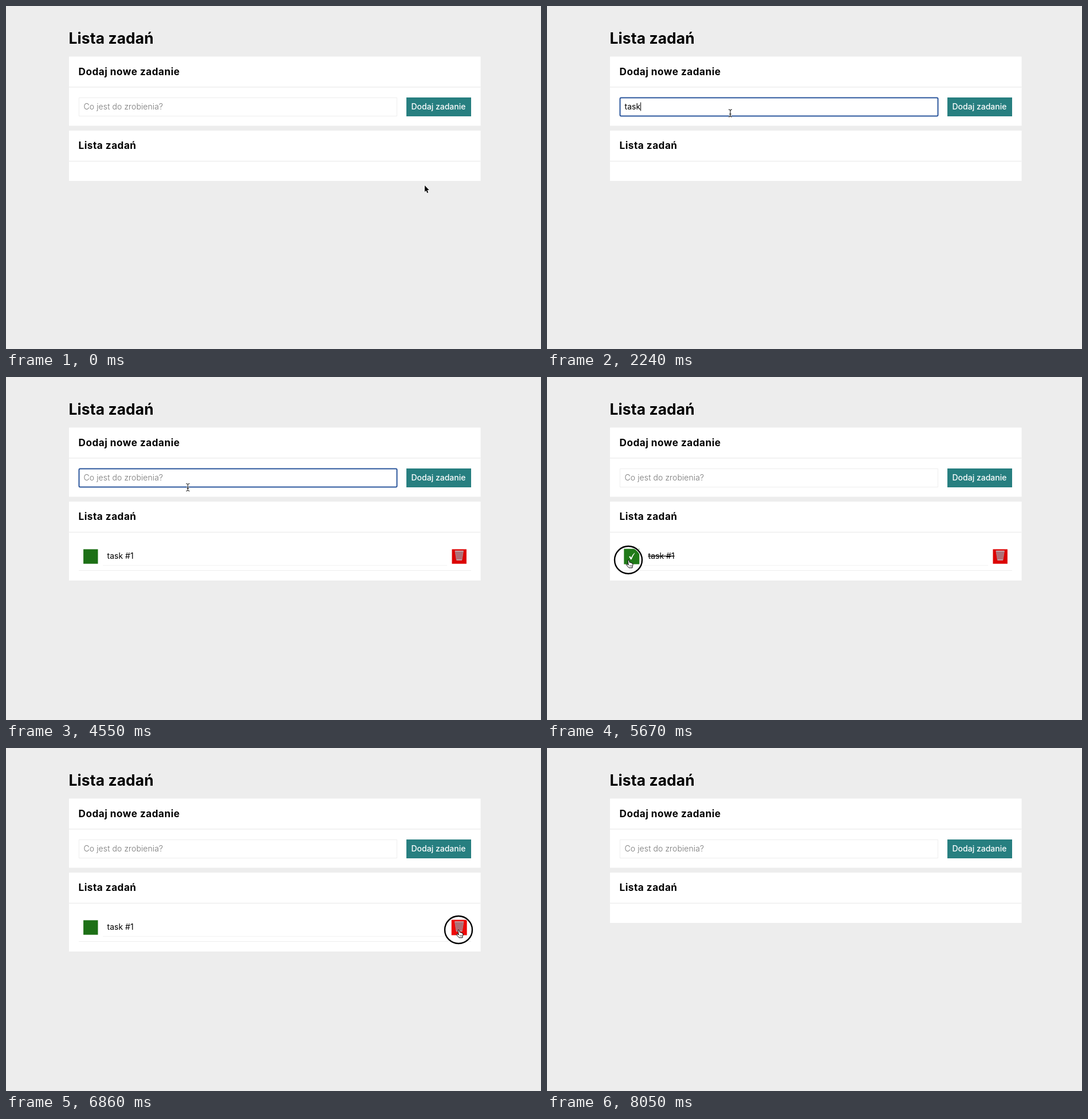
Write an HTML page that moves like this. It is 934 px wide and 600 px high and loops after 8.19 s.

```html
<!DOCTYPE html>
<html lang="pl">
<head>
<meta charset="utf-8">
<title>Lista zadań</title>
<style>
html, body { margin: 0; width: 100%; height: 100%; overflow: hidden; background: #ededed; }
svg { display: block; width: 934px; height: 600px; font: 400 14px Inter, "Open Sans", sans-serif; }
text { white-space: pre; }
.title { font-size: 26.4px; font-weight: 700; letter-spacing: .12px; }
.head { font-size: 17.2px; font-weight: 700; letter-spacing: .48px; }
.hint { font-weight: 300; letter-spacing: .1px; fill: #757575; }
.label { font-weight: 500; fill: #fff; }
.card { fill: #fff; }
.rule { stroke: #eee; stroke-width: 1.5; }
.done { text-decoration: line-through; }
</style>
</head>
<body>
<svg viewBox="0 0 934 600">
  <rect width="934" height="600" fill="#ededed"/>
  <text class="title" x="109.5" y="65.5">Lista zadań</text>

  <rect class="card" x="110" y="88.5" width="718.6" height="121"/>
  <text class="head" x="126.5" y="120.5">Dodaj nowe zadanie</text>
  <path class="rule" d="M110 141.7H828.6"/>
  <rect id="field" x="127.5" y="160.5" width="555" height="32" fill="#fff"/>
  <text id="hint" class="hint" x="135.5" y="180.5">Co jest do zrobienia?</text>
  <text id="typed" x="135.5" y="180.5"></text>
  <rect id="caret" y="168.5" width="1" height="15"/>
  <rect x="699" y="160" width="113" height="33" fill="#277f80"/>
  <text class="label" x="707.5" y="180.5">Dodaj zadanie</text>

  <rect id="list" class="card" x="110" y="218" width="718.6" height="88"/>
  <text class="head" x="126.5" y="250">Lista zadań</text>
  <path class="rule" d="M110 271.5H828.6"/>
  <g id="row">
    <path d="M169 329.5H770" stroke="#f3f3f3"/>
    <path d="M127 338.5H812" stroke="#eee"/>
    <text id="task" x="176.5" y="318">task #1</text>
    <g id="toggle">
      <rect x="-12.7" y="-12.7" width="25.4" height="25.4"/>
      <path id="tick" fill="#fff" d="M-4.5 .5L-2.6 -.8L-.9 1.8Q1.5 -3.5 4.8 -6.2L5.2 -5.6Q1.6 -.6 -.3 5L-1.8 5Q-2.8 2.4 -4.5 .5Z"/>
    </g>
    <g id="bin">
      <rect x="-12.7" y="-12.7" width="25.4" height="25.4"/>
      <path d="M-7.5 -9.5H7.5L4.8 6.5H-4.8Z" fill="#bb6a70"/>
      <path d="M-5 -8L2 4M-1 -8L4 1M3 -8L5 -4M5 -8L-2 4M1 -8L-4 1M-3 -8L-5 -4" stroke="#927b83" stroke-width=".8"/>
      <path d="M-7.5 -9.5H7.5M-4.8 6H4.8" stroke="#c9b9bc" stroke-width="1.3"/>
      <path d="M-7 -8.5L-4.8 6M7 -8.5L4.8 6" stroke="#a5878e" stroke-width=".8"/>
    </g>
  </g>

  <g id="pointer">
    <g id="ring" fill="none">
      <circle stroke="#fff" stroke-width="4.6"/>
      <circle stroke="#000" stroke-width="2.4"/>
    </g>
    <path id="arrow" d="M0 0V11L2.5 8.7L4.3 13L6.1 12.2L4.3 8H7.7Z" stroke="#fff" stroke-width="1" paint-order="stroke"/>
    <g id="beam" fill="none">
      <path d="M-3 -6Q0 -6 0 -4Q0 -6 3 -6M0 -4V5M-3 7Q0 7 0 5Q0 7 3 7M-1.7 2H1.7" stroke="#fff" stroke-width="2.6"/>
      <path d="M-3 -6Q0 -6 0 -4Q0 -6 3 -6M0 -4V5M-3 7Q0 7 0 5Q0 7 3 7M-1.7 2H1.7" stroke="#000"/>
    </g>
    <g id="hand" fill="#fff" stroke="#000" stroke-width="1" stroke-linejoin="round">
      <path d="M-1 .8Q0 -.7 1.2 .8L2.3 4.6Q3.6 3.8 4.2 5.1Q5.4 4.5 6 5.8Q7.6 5.5 7.9 7.2Q8.2 10 7 11.6V13.8H1L-3.8 8.2Q-3.4 6.3 -1.2 8L.2 9Z"/>
      <path d="M2.6 9V11.6M4.4 9V11.6M6 9V11.6" stroke-width=".6"/>
    </g>
  </g>
</svg>
<script>
const LOOP = 8190, STEP = 70;
const FOCUS = 700, ENTER = 3780, BLUR = 5180;
const DONE = 5320, UNDONE = 5810, REMOVED = 7000, GONE = 8050;
const presses = [630, 5180, 5670, 6860];
const keys = [[1470, "t"], [1610, "a"], [1750, "s"], [2100, "k"], [2660, " "], [3220, "#"], [3640, "1"]];
// time, x, y
const path = [
  [0, 731, 314], [630, 314, 182], [910, 314, 182], [1260, 318, 185], [1820, 320, 187],
  [2240, 320, 187], [2660, 321, 189], [4270, 321, 190], [4500, 321, 190], [5110, 139, 321],
  [5320, 139, 321], [5600, 142, 320], [5880, 142, 320], [6720, 790, 318],
  [7140, 790, 318], [8050, 880, 604]
];

const el = {};
for (const node of document.querySelectorAll("[id]")) el[node.id] = node;
const show = (node, on) => { node.style.display = on ? "" : "none"; };
const set = (node, attrs) => { for (const k in attrs) node.setAttribute(k, attrs[k]); };
const inside = (x, y, x0, y0, x1, y1) => x >= x0 && x <= x1 && y >= y0 && y <= y1;

function position(t) {
  const i = path.findIndex(p => p[0] > t);
  if (i < 0) return path[path.length - 1].slice(1);
  const [t0, x0, y0] = path[i - 1], [t1, x1, y1] = path[i];
  const u = (t - t0) / (t1 - t0), e = u * u * (3 - 2 * u);
  return [x0 + (x1 - x0) * e, y0 + (y1 - y0) * e];
}

function drawField(t) {
  const focused = t >= FOCUS && t < BLUR;
  const text = t < ENTER ? keys.filter(k => k[0] <= t).map(k => k[1]).join("") : "";
  set(el.field, { stroke: focused ? "#2b569c" : "#eee", "stroke-width": focused ? 2 : 1, rx: focused ? 2 : 0 });
  el.typed.textContent = text;
  show(el.hint, !text);

  const last = Math.max(...[FOCUS, ENTER, ...keys.map(k => k[0])].filter(k => k <= t));
  show(el.caret, focused && (t - last) % 1000 < 500);
  set(el.caret, { x: text ? 135.5 + el.typed.getComputedTextLength() : 136 });
}

function drawButton(node, x, hover, base, lit) {
  set(node, { transform: `translate(${x} 314) scale(${hover ? 1.06 : 1})` });
  set(node.firstElementChild, { fill: hover ? lit : base });
}

function draw(t) {
  const [x, y] = position(t);
  const listed = t >= ENTER && t < REMOVED;
  const done = t >= DONE && t < UNDONE;
  const overToggle = listed && inside(x, y, 135, 301, 161, 327);
  const overBin = listed && inside(x, y, 778, 301, 804, 327);
  const overText = inside(x, y, 127, 160, 683, 193) || listed && inside(x, y, 177, 305, 222, 322);

  drawField(t);
  show(el.row, listed);
  set(el.list, { height: listed ? 138 : 88 });
  drawButton(el.toggle, 147.8, overToggle, "#1d7016", "#207a18");
  drawButton(el.bin, 791.2, overBin, "#dc0303", "#ed0a0a");
  show(el.tick, done);
  set(el.task, { class: done ? "done" : "" });

  show(el.pointer, t < GONE);
  set(el.pointer, { transform: `translate(${x.toFixed(1)} ${y.toFixed(1)})` });
  show(el.hand, overToggle || overBin);
  show(el.beam, overText);
  show(el.arrow, !overToggle && !overBin && !overText);

  const press = presses.find(p => t >= p && t < p + 280);
  show(el.ring, press !== undefined);
  if (press !== undefined) {
    const r = 24 - 12 * Math.min(1, (t - press) / 140);
    for (const c of el.ring.children) set(c, { r });
  }
}

function tick() {
  const t = performance.now() % LOOP;
  draw(Math.floor(t / STEP) * STEP);
  requestAnimationFrame(tick);
}
tick();
</script>
</body>
</html>
```
